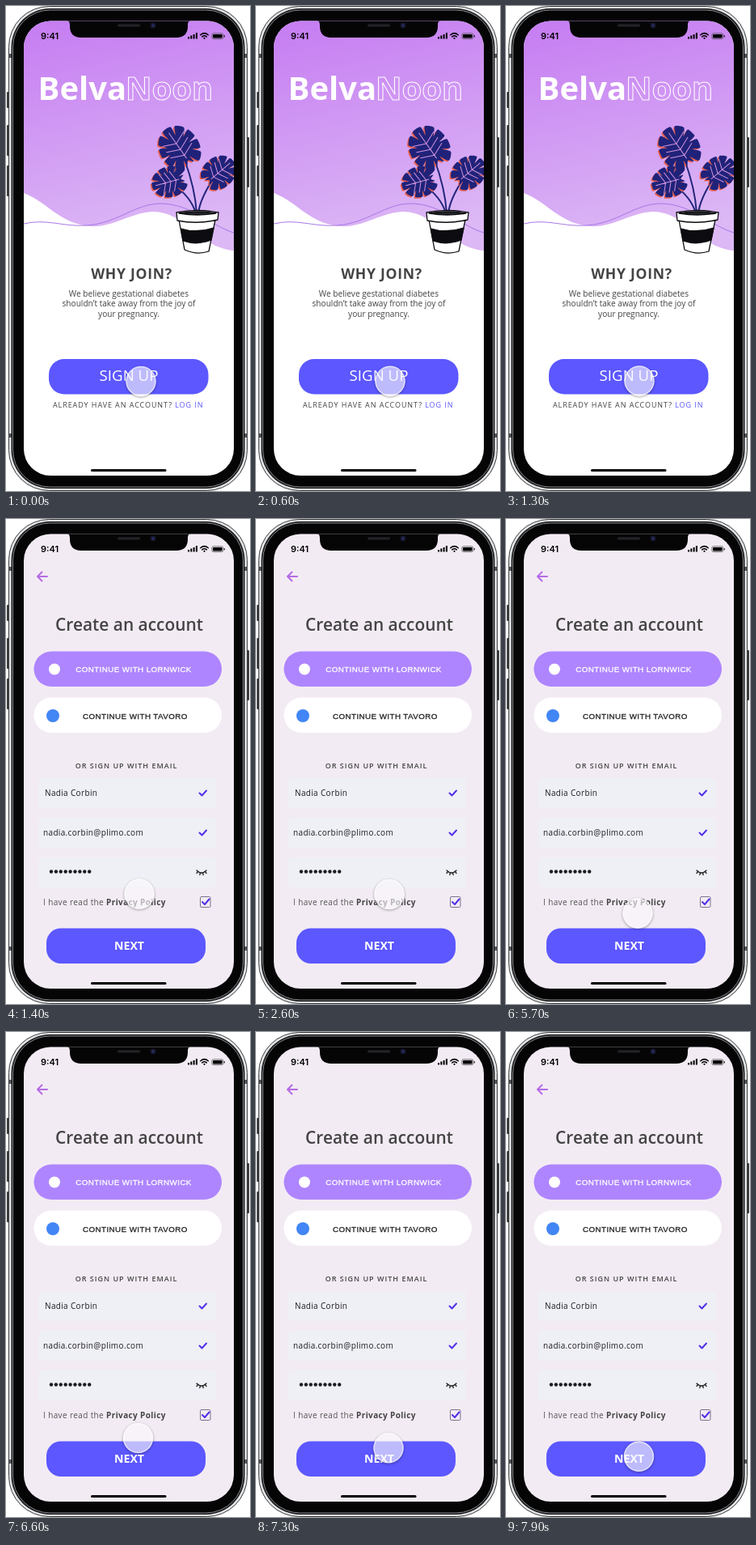
An HTML page for the animation above (8000 ms loop, 302 px wide and 599 px high).

```html
<!DOCTYPE html>
<html lang="en">
<head>
<meta charset="utf-8">
<title>Sign up</title>
<style>
html, body { margin: 0; width: 100%; height: 100%; overflow: hidden; background: #fff; }
svg { display: block; width: 302px; height: 599px; }
text { font-family: "Open Sans", sans-serif; white-space: pre; }
.mid { text-anchor: middle; }
.arial { font-family: "Liberation Sans", Arial, sans-serif; font-size: 9.8px; letter-spacing: .42px; stroke-width: .3px; }
.line { fill: none; stroke-linecap: round; stroke-linejoin: round; }
.field { fill: #eff0f5; }
.entry { font-size: 10px; font-weight: 500; fill: #1d1b22; letter-spacing: .34px; }
.body { font-size: 10.15px; fill: #444; }
.check { stroke: #5230e8; stroke-width: 2; }
</style>
</head>
<body>
<svg viewBox="0 0 302 599">
  <defs>
    <linearGradient id="sky" x1=".1" y1="0" x2=".3" y2="1">
      <stop offset="0" stop-color="#c67df2"/>
      <stop offset="1" stop-color="#dcb8f5"/>
    </linearGradient>
    <clipPath id="glass"><rect x="22" y="18.500" width="260" height="561.500" rx="33"/></clipPath>
    <filter id="soft" x="-50%" y="-50%" width="200%" height="200%">
      <feGaussianBlur stdDeviation="1.6"/>
    </filter>
    <mask id="around">
      <rect width="302" height="599" fill="#fff"/>
      <circle id="hole" r="18.500" fill="#000"/>
    </mask>
  </defs>

  <g id="case">
    <g fill="#3a3b3d">
      <rect x="1" y="106" width="3" height="20" rx="1"/>
      <rect x="1" y="147" width="3" height="38" rx="1"/>
      <rect x="1" y="197" width="3" height="38" rx="1"/>
      <rect x="298" y="162" width="3" height="62" rx="1"/>
    </g>
    <rect x="3.500" y=".5" width="295" height="598" rx="50" fill="#e4e6e8" stroke="#3a3b3d"/>
    <g fill="#55585b">
      <rect x="4" y="59" width="4" height="5"/><rect x="294" y="59" width="4" height="5"/>
      <rect x="4" y="528" width="4" height="5"/><rect x="294" y="528" width="4" height="5"/>
    </g>
    <rect x="6.500" y="3" width="289" height="593" rx="48" fill="#1b1b1d"/>
    <rect x="8.500" y="5" width="285" height="589" rx="46" fill="#050506" stroke="#85888b"/>
  </g>

  <g clip-path="url(#glass)">
    <g id="welcome">
      <rect x="22" y="18" width="260" height="562" fill="#fff"/>
      <path fill="url(#sky)" d="M22 18H282V302C238 298 222 254 182 254C154 255 132 274 104 272C64 268 52 242 22 231Z"/>
      <path class="line" stroke="#a777e6" d="M22 269C50 262 70 273 100 271C140 268 160 243 194 244C232 246 254 272 282 280"/>
      <text x="39.500" y="116" font-size="40" font-weight="700" fill="#fff">Belva</text>
      <text x="148" y="116" font-size="40" font-weight="700" fill="none" stroke="#fff" stroke-width="1.100">Noon</text>
      <g id="plant">
        <g class="line" stroke="#24267c" stroke-width="2">
          <path d="M236 256Q234 225 221 190"/>
          <path d="M235 256Q229 236 208 221"/>
          <path d="M238 256Q240 238 258 211"/>
        </g>
        <g id="leaves"></g>
        <g stroke="#0c0c10" stroke-width="1.300" stroke-linejoin="round">
          <path fill="#fff" d="M214 264L221 301Q236 308 251 303L259 264Z"/>
          <path fill="#0c0c10" d="M216.500 275Q236 281 257 274L254 289Q236 296 219 290Z"/>
          <path fill="#fff" d="M211 255Q237 250 263 255L262 264Q237 270 212 265Z"/>
          <path fill="#24242c" d="M214 256Q237 252 260 256Q237 260 214 256Z"/>
        </g>
      </g>
      <text class="mid" x="155.500" y="337" font-size="17.600" font-weight="700" letter-spacing=".7" fill="#444">WHY JOIN?</text>
      <text class="mid body" x="152" y="359">We believe gestational diabetes</text>
      <text class="mid body" x="152" y="371">shouldn’t take away from the joy of</text>
      <text class="mid body" x="152" y="383.500">your pregnancy.</text>
      <rect x="53" y="436" width="197.500" height="43.500" rx="19" fill="#5c57ff"/>
      <text class="mid" x="152" y="463" font-size="18.700" fill="#fff">SIGN UP</text>
      <text x="58" y="496" font-size="9" letter-spacing=".92" fill="#444">ALREADY HAVE AN ACCOUNT? <tspan fill="#5c57ff">LOG IN</tspan></text>
    </g>

    <g id="form">
      <rect x="22" y="18" width="260" height="562" fill="#f3ebf4"/>
      <path class="line" stroke="#b56be6" stroke-width="2" d="M51 71H39M44.500 65.500L39 71L44.500 76.500"/>
      <text class="mid" x="152.500" y="138" font-size="20.900" font-weight="600" fill="#444">Create an account</text>
      <rect x="34.500" y="163.500" width="232.500" height="43.500" rx="21.700" fill="#ae85ff"/>
      <circle cx="60" cy="185.500" r="7" fill="#fff"/>
      <text class="mid arial" x="158" y="189" fill="#fff" stroke="#fff">CONTINUE WITH LORNWICK</text>
      <rect x="34.500" y="220.500" width="232.500" height="43.500" rx="21.700" fill="#fff"/>
      <circle cx="58" cy="243" r="8" fill="#4285f4"/>
      <text class="arial" x="95" y="247" fill="#222" stroke="#222">CONTINUE WITH TAVORO</text>
      <text class="mid" x="149" y="308" font-size="9" font-weight="600" letter-spacing="1" fill="#444">OR SIGN UP WITH EMAIL</text>
      <rect class="field" x="40" y="320" width="220" height="37" rx="5"/>
      <rect class="field" x="40" y="369" width="220" height="37" rx="5"/>
      <rect class="field" x="40" y="418" width="220" height="37" rx="5"/>
      <text class="entry" x="48" y="342">Nadia Corbin</text>
      <text class="entry" x="46" y="390.500">nadia.corbin@plimo.com</text>
      <g id="dots" fill="#1d1b22"></g>
      <path class="line check" d="M239.500 338.500l3 3l5.500-6M239.500 387.500l3 3l5.500-6"/>
      <path class="line" stroke="#222" stroke-width="1.300" d="M236 434Q242 440 248 434M237.500 435.500l-1.500 2M240.500 437l-.7 2.500M243.500 437l.7 2.500M246.500 435.500l1.500 2"/>
      <text x="46" y="477" font-size="10" letter-spacing=".38" fill="#555">I have read the <tspan font-weight="700" fill="#444">Privacy Policy</tspan></text>
      <rect x="240.500" y="466.500" width="12.500" height="13" rx="1.500" fill="none" stroke="#77738a"/>
      <path class="line check" d="M243 473l3 3l5.500-6.500"/>
      <rect x="50" y="505.500" width="197" height="43.500" rx="18" fill="#5c57ff"/>
      <text class="mid" x="152.500" y="532" font-size="14.200" font-weight="700" fill="#fff">NEXT</text>
    </g>

    <g id="status">
      <text x="43" y="41" font-size="11" font-weight="600" style="font-family:Inter,sans-serif">9:41</text>
      <path d="M225 38h2v2.500h-2zM228.300 36.500h2v4h-2zM231.600 35h2v5.500h-2zM234.900 33h2v7.500h-2z"/>
      <g class="line" stroke="#000" stroke-width="1.500">
        <path d="M240.700 35.700Q245.500 31.600 250.300 35.700M242.700 37.900Q245.500 35.600 248.300 37.900"/>
      </g>
      <circle cx="245.500" cy="39.800" r="1.100"/>
      <rect x="254.800" y="33.800" width="14" height="6.800" rx="2" fill="none" stroke="#555" stroke-width=".8"/>
      <rect x="256" y="35" width="11.600" height="4.400" rx="1"/>
      <rect x="269.700" y="36" width="1" height="2.500" rx=".5"/>
    </g>
    <rect x="105" y="572" width="93.500" height="3" rx="1.500"/>

    <path fill="#050506" d="M74 18C78 18 79 20 79 24V25C79 34 84 39 93 39H211C220 39 225 34 225 25V24C225 20 226 18 230 18Z"/>
    <rect x="138" y="22.500" width="28" height="3" rx="1.500" fill="#242428"/>
    <circle cx="182" cy="24" r="3.500" fill="#16182c"/>
    <circle cx="182" cy="24" r="1.500" fill="#2b3270"/>

    <g mask="url(#around)"><circle id="shade" r="19" opacity=".3" filter="url(#soft)"/></g>
    <g id="touch">
      <circle r="18.500" fill="#fbf9fc" fill-opacity=".62"/>
      <circle r="18" fill="none" stroke="#fff" stroke-opacity=".6" stroke-width="1.500"/>
    </g>
  </g>
</svg>
<script>
const $ = id => document.getElementById(id);
const LOOP = 8000, SWITCH = 1400;

// time, x, y of the touch point
const path = [
  [0, 167, 463.5], [1200, 165, 463], [4300, 165, 464],
  [5700, 163, 487], [6600, 163.5, 501.5], [8000, 164.5, 526]
];

// Lobed leaf in polar form, with its tip at angle zero
function leafPath(size) {
  const pts = [];
  for (let i = 0; i < 240; i++) {
    const a = i / 240 * 2 * Math.PI;
    const base = .96 + .06 * Math.cos(2 * a) - .4 * Math.exp(-(((a - Math.PI) / .25) ** 2));
    const r = size * base * (1 - .42 * Math.abs(Math.sin(5 * a)) ** 30);
    pts.push((r * Math.cos(a)).toFixed(1) + " " + (r * .94 * Math.sin(a)).toFixed(1));
  }
  return "M" + pts.join("L") + "Z";
}

function veins(size) {
  let d = `M${-size * .5} 0L${size * .8} 0`;
  for (const x of [-.35, -.05, .25]) {
    for (const side of [-1, 1]) d += `M${x * size} 0L${(x + .24) * size} ${side * .55 * size}`;
  }
  return d;
}

function leaf(x, y, size, turn) {
  const d = leafPath(size);
  return `<g transform="translate(${x} ${y})">
    <path d="${d}" fill="#e9614f" transform="translate(-1.5 1.5) rotate(${turn})"/>
    <g transform="rotate(${turn})"><path d="${d}" fill="#20227a"/>
    <path class="line" d="${veins(size)}" stroke="#cf93dc" stroke-width="1"/></g></g>`;
}

$("leaves").innerHTML = leaf(215, 176, 29, -125) + leaf(203, 217, 22.5, 165) + leaf(263, 206, 23, -40);
$("dots").innerHTML = Array.from({ length: 9 }, (_, i) =>
  `<circle cx="${56 + i * 5.9}" cy="435.5" r="2.2"/>`).join("");

function touchAt(t) {
  const i = path.findIndex(p => p[0] > t);
  const [t0, x0, y0] = path[i - 1], [t1, x1, y1] = path[i];
  const k = (t - t0) / (t1 - t0);
  return [x0 + (x1 - x0) * k, y0 + (y1 - y0) * k];
}

function draw() {
  const t = performance.now() % LOOP;
  const [x, y] = touchAt(t);
  $("welcome").style.display = t < SWITCH ? "" : "none";
  $("form").style.display = t < SWITCH ? "none" : "";
  $("touch").setAttribute("transform", `translate(${x} ${y})`);
  $("hole").setAttribute("transform", `translate(${x} ${y})`);
  $("shade").setAttribute("transform", `translate(${x} ${y + 1})`);
  requestAnimationFrame(draw);
}
draw();
</script>
</body>
</html>
```
